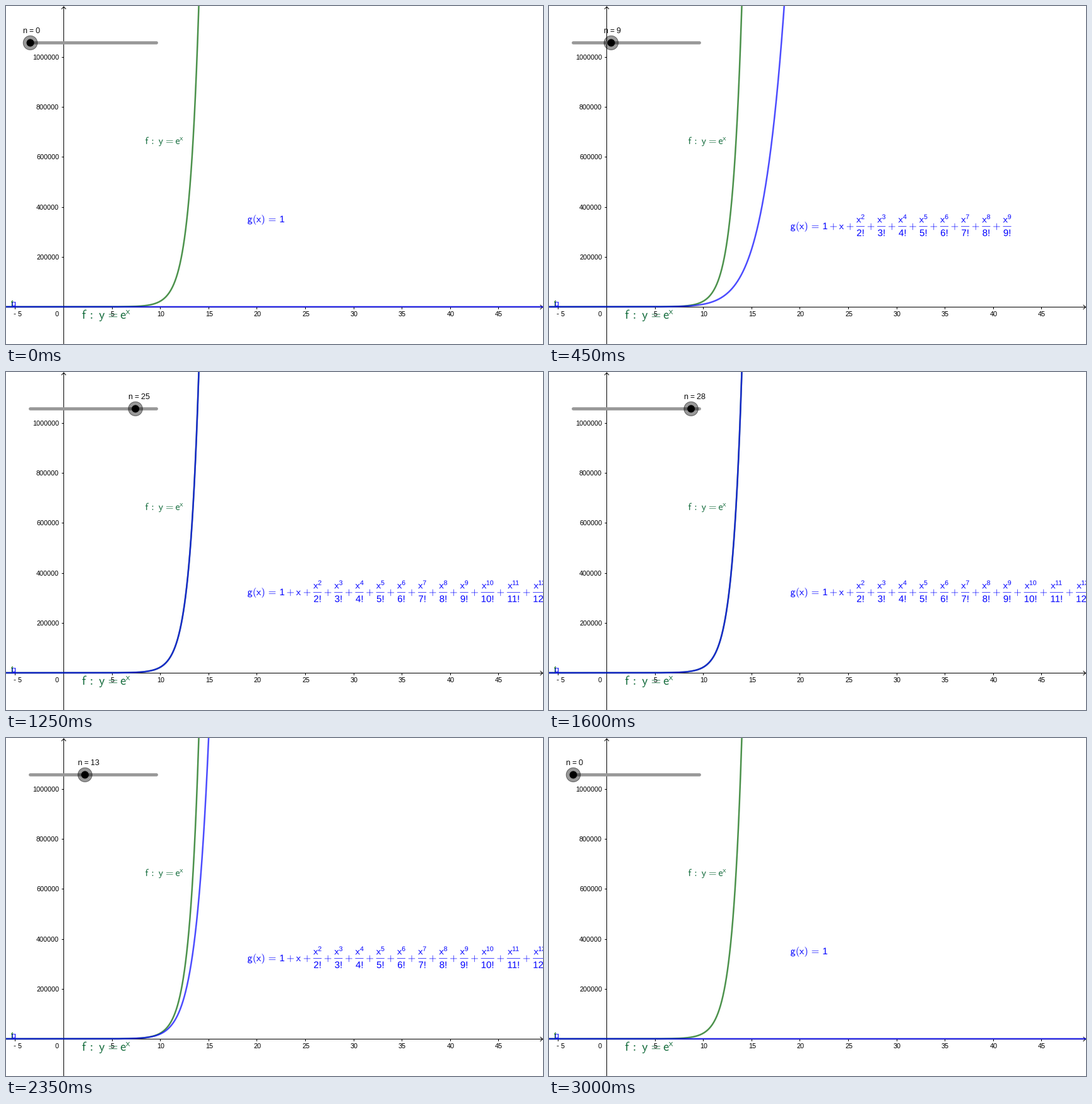
Animation, 851 px wide and 536 px high, one loop 3050 ms. Source, as a matplotlib script:

```python
import numpy as np
import matplotlib.pyplot as plt
from matplotlib.animation import FuncAnimation
from matplotlib.patches import Circle, PathPatch
from matplotlib.path import Path
from matplotlib.textpath import TextPath

plt.rcParams.update({
    "mathtext.fontset": "cm",
    "font.family": "Liberation Sans",
    "text.hinting": "native",
    "text.hinting_factor": 1,
    "toolbar": "None",
})

W, H, DPI = 851, 536, 72
X0, Y0 = 91, 477              # origin of the plot on the stage
UX, UY = 15.32, 396e-6        # pixels per unit
N_MAX = 30
STEPS = 2 * N_MAX + 1
EM = 16
GREEN, BLUE, TEXT_GREEN = "#006400", "#0000ff", "#146c3c"

fig = plt.figure(figsize=((W + 0.01) / DPI, (H + 0.01) / DPI), dpi=DPI,
                 facecolor="white")
ax = fig.add_axes([0, 0, 1, 1])
ax.set_xlim(0, W)
ax.set_ylim(H, 0)
ax.axis("off")


def glyphs(s, x, y, size=EM, center=False):
    """Outline of s on baseline y, its ink starting at or centred on x."""
    if s[0].isdigit():
        p = TextPath((0, 0), s, size=0.94 * size)
    else:
        p = TextPath((0, 0), rf"$\mathsf{{{s}}}$", size=size)
    box = p.get_extents()
    anchor = (box.x0 + box.x1) / 2 if center else box.x0
    return Path(p.vertices * [1, -1] + [x - anchor, y], p.codes)


def rule(x, y, w, h=0.7):
    pts = [(x, y), (x + w, y), (x + w, y + h), (x, y + h), (x, y)]
    return Path(pts, [Path.MOVETO] + [Path.LINETO] * 3 + [Path.CLOSEPOLY])


def series(n):
    """Outline of g(x) = 1 + x + x^2/2! + ... up to degree n."""
    base = 354 if n > 1 else 343
    parts = [glyphs(s, x, base) for s, x in
             [("g", 383), ("(", 392.4), ("x", 396.8), (")", 405.4),
              ("=", 416.6), ("1", 434.5)]]
    if n > 0:
        parts += [glyphs("+", 445.5, base), glyphs("x", 459.8, base)]
    left, prev_end = 487.0, 467.3
    for k in range(2, n + 1):
        digits = len(str(k))
        width = (0.5 * digits + 0.319) * EM
        top = left + (width - (0.461 + 0.35 * digits) * EM) / 2
        parts += [
            glyphs("+", (prev_end + left) / 2, base, center=True),
            glyphs("x", top + 0.1, 343.4),
            glyphs(str(k), top + 7.8, 337.8, 0.7 * EM),
            rule(left, 349.1, width),
            glyphs(f"{k}!", left + width / 2 - 0.2, 364.8, center=True),
        ]
        prev_end = left + width
        left = prev_end + 20.1
    return Path.make_compound_path(*parts)


def exp_label(x, y, size):
    k = size / EM
    row = [("f", 0), (":", 10.6), ("y", 20.9), ("=", 33), ("e", 48)]
    parts = [glyphs(s, x + dx * k, y, size) for s, dx in row]
    parts.append(glyphs("x", x + 54.3 * k, y - 5.8 * k, 0.7 * size))
    return Path.make_compound_path(*parts)


def ink(path, color):
    return ax.add_patch(PathPatch(path, fc=color, lw=0, snap=False, zorder=6))


def stroke(xs, ys, **kw):
    kw = {"color": "black", "lw": 1, "solid_capstyle": "butt",
          "snap": False, "zorder": 1, **kw}
    return ax.plot(xs, ys, **kw)[0]


def label(x, y, s, size=11, **kw):
    return ax.text(x, y, s, fontsize=size, va="baseline", zorder=5, **kw)


def crisp(v):
    """Centre of the pixel nearest to v."""
    return round(v) + 0.5


# axes
AX, AY = crisp(X0), crisp(Y0)
stroke([0, W], [AY, AY])
stroke([AX, AX], [1, H])
stroke([AX - 3.5, AX, AX + 3.5], [5, 1, 5])
stroke([W - 4.5, W - 0.5, W - 4.5], [AY - 3.5, AY, AY + 3.5])
for v in range(-5, 50, 5):
    x = crisp(X0 + v * UX)
    if v:
        stroke([x, x], [AY, AY + 3.5])
        text = str(v) if v > 0 else f"- {-v}"
        label(x + (0.5 if v > 0 else 4), 492, text, ha="center")
label(84, 492, "0", ha="right")
for v in range(200000, 1000001, 200000):
    y = crisp(Y0 - v * UY)
    stroke([AX - 3, AX], [y, y])
    label(84, y + 3.5, str(v), ha="right")

# curves
t = np.linspace(-6.2, 50, 4000)
px = X0 + t * UX


def to_stage(v):
    return Y0 - np.minimum(v, 2e6) * UY


def partial_sum(n):
    term = np.ones_like(t)
    total = term.copy()
    for k in range(1, n + 1):
        term = term * t / k
        total += term
    return total


stroke(px, to_stage(np.exp(t)), color=GREEN, alpha=0.7, lw=2.5, zorder=2)
approx = stroke(px, to_stage(partial_sum(0)), color=BLUE, alpha=0.7, lw=2.5,
                zorder=3)
label(8, 476, "f", 12, color=GREEN)
label(8, 476, "g", 12, color=BLUE)

# formulas
ink(exp_label(221, 219, EM), TEXT_GREEN)
ink(exp_label(121, 496, 20.3), TEXT_GREEN)
formulas = [series(n) for n in range(13)]   # later terms lie off the stage
formula = ink(formulas[0], BLUE)

# slider
SX, SY, S_STEP = 38.5, 58.4, 20 / 3
stroke([SX, SX + N_MAX * S_STEP], [SY, SY], color="#999999", lw=5,
       solid_capstyle="round", zorder=7)
knob = ax.add_patch(Circle((SX, SY), 11.2, fc=(0, 0, 0, 0.4),
                           ec=(0, 0, 0, 0.5), lw=1, zorder=8))
dot = ax.add_patch(Circle((SX, SY), 6, fc="black", lw=0, zorder=9))
count = label(27, 43, "n = 0", 12)


def update(i):
    n = min(i, STEPS - 1 - i)
    x = SX + n * S_STEP
    knob.center = dot.center = (x, SY)
    count.set_text(f"n = {n}")
    count.set_x(x - 11.5)
    approx.set_ydata(to_stage(partial_sum(n)))
    formula.set_path(formulas[min(n, len(formulas) - 1)])
    return knob, dot, count, approx, formula


anim = FuncAnimation(fig, update, frames=STEPS, interval=50,
                     init_func=lambda: update(0), repeat=True, repeat_delay=0)
plt.show()
```
